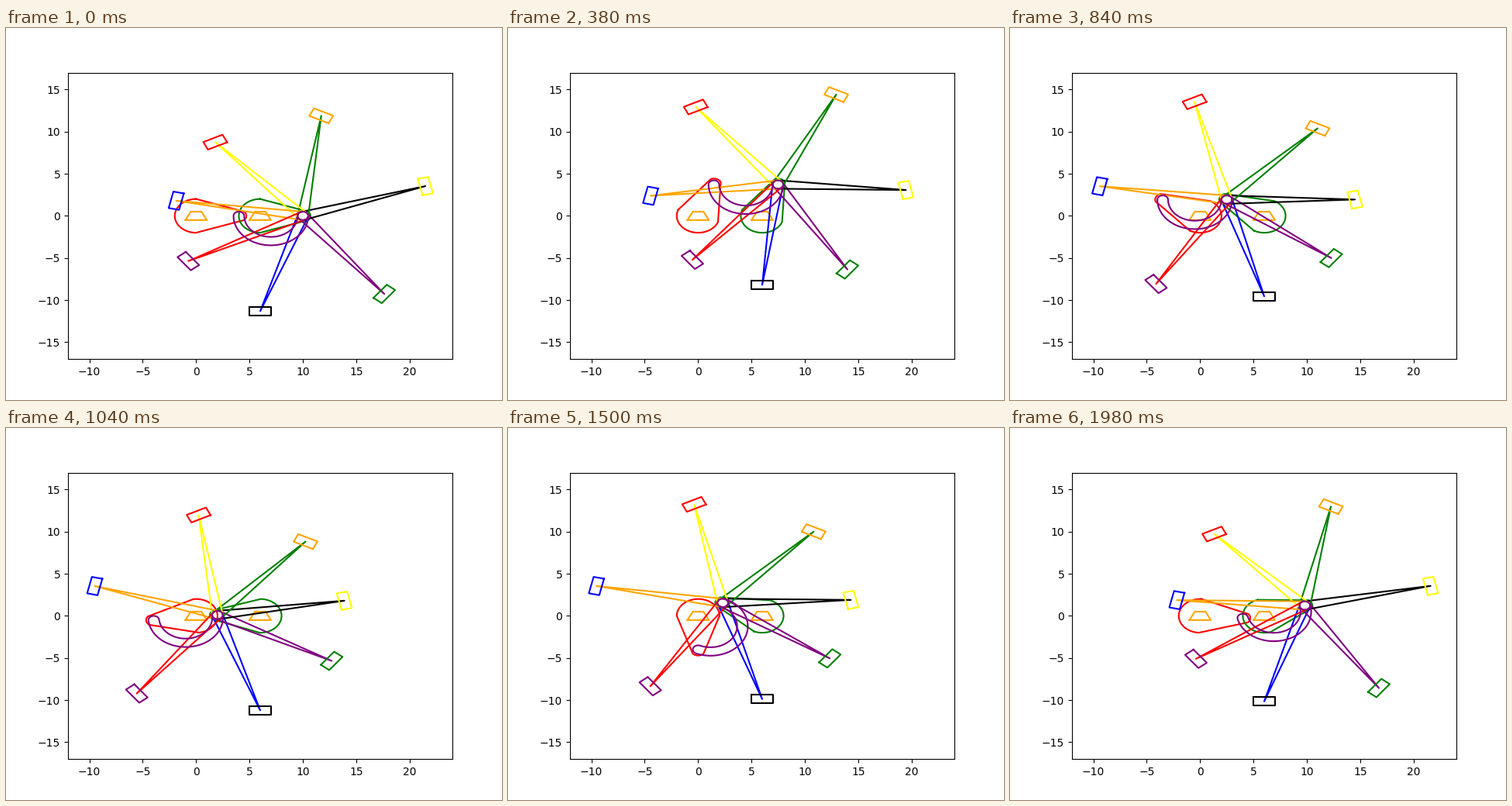
Animation of 640x480 px, one loop 2000 ms. Source, as a matplotlib script:

```python
import numpy as np
import matplotlib.pyplot as plt
from matplotlib.animation import FuncAnimation

FRAMES, INTERVAL = 100, 20
CRANK, COUPLER, ROD = 4, 6, 12
BASE_A, BASE_B = 0, 6  # points are complex numbers

ROD_COLORS = ["blue", "purple", "black", "green", "yellow", "orange", "red"]
BOX_COLORS = ["black", "green", "yellow", "orange", "red", "blue", "purple"]
RAYS = np.exp(1j * (-np.pi / 2 + 2 * np.pi * np.arange(7) / 7))


def arc(center, radius, start, stop, n=60):
    return center + radius * np.exp(1j * np.radians(np.linspace(start, stop, n)))


# Shapes in local coordinates, pointing along +x
CRANK_SHAPE = np.concatenate([
    arc(0, 2, 90, 270),
    arc(CRANK, np.sqrt(0.5), -45, 45, 20),
    [2j],
])
COUPLER_SHAPE = np.concatenate([
    arc(3, 3.5, 360, 180),
    arc(0, 0.5, 180, 0, 30),
    arc(3, 2.5, 180, 360),
    arc(COUPLER, 0.5, 180, -180),
])
BOX_SHAPE = np.array([-0.5 - 1j, 0.5 - 1j, 0.5 + 1j, -0.5 + 1j, -0.5 - 1j])
STAND_SHAPE = np.array([-1 - 0.5j, 1 - 0.5j, 0.5 + 0.5j, -0.5 + 0.5j, -1 - 0.5j])


def unit(z):
    return z / abs(z)


def joints(angle):
    """Ends of the two cranks; the coupler always takes the left-hand branch."""
    a = CRANK * np.exp(1j * angle)
    gap = BASE_B - a
    d = abs(gap)
    cos_a = (COUPLER**2 + d**2 - CRANK**2) / (2 * COUPLER * d)
    b = a + COUPLER * unit(gap) * np.exp(1j * np.arccos(np.clip(cos_a, -1, 1)))
    return a, b


def slider(pin, ray):
    """Point on the ray from BASE_B at rod distance from the pin."""
    v = (pin - BASE_B) * np.conj(ray)
    return BASE_B + ray * (v.real + np.sqrt(ROD**2 - v.imag**2))


fig, ax = plt.subplots(figsize=(6.4, 4.8), dpi=100)
ax.set_xlim(-12, 24)
ax.set_ylim(-17, 17)


def new_line(color):
    return ax.plot([], [], color=color, lw=1.5)[0]


def put(line, z):
    line.set_data(z.real, z.imag)


for base in (BASE_A, BASE_B):
    put(new_line("orange"), base + STAND_SHAPE)
crank_a, crank_b = new_line("red"), new_line("green")
rods = [new_line(c) for c in ROD_COLORS]
boxes = [new_line(c) for c in BOX_COLORS]
coupler = new_line("purple")


def update(i):
    a, b = joints(2 * np.pi * i / FRAMES)
    put(crank_a, BASE_A + unit(a - BASE_A) * CRANK_SHAPE)
    put(crank_b, BASE_B + unit(b - BASE_B) * CRANK_SHAPE)
    put(coupler, a + unit(b - a) * COUPLER_SHAPE)
    for ray, rod, box in zip(RAYS, rods, boxes):
        s = slider(b, ray)
        side = 0.5j * unit(s - b)
        put(rod, np.array([b + side, s, b - side]))
        put(box, s + ray * BOX_SHAPE)
    return [crank_a, crank_b, coupler, *rods, *boxes]


anim = FuncAnimation(fig, update, frames=FRAMES, interval=INTERVAL,
                     repeat=True, repeat_delay=0)
plt.show()
```
